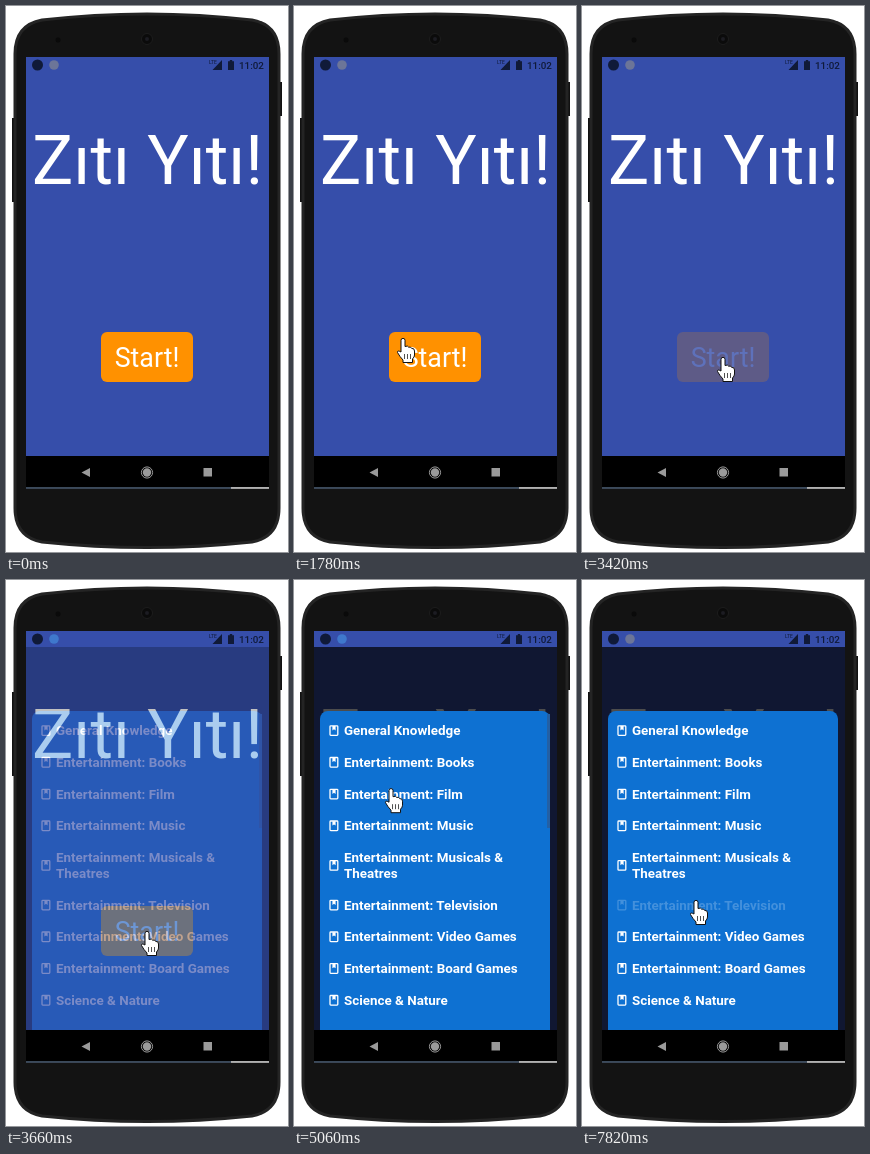
An HTML page for the animation above (8 s loop, 282 px wide and 546 px high).

```html
<!DOCTYPE html>
<html lang="en">
<head>
<meta charset="utf-8">
<style>
  html, body { margin: 0; width: 100%; height: 100%; overflow: hidden; background: #fff; }
  svg { display: block; width: 282px; height: 546px; font-family: Roboto, sans-serif; }
  .list { font-size: 13.4px; font-weight: 700; fill: #fff; }
</style>
</head>
<body>
<svg viewBox="0 0 282 546">
  <defs>
    <clipPath id="view"><rect x="20" y="51" width="243" height="399"/></clipPath>
    <g id="book">
      <rect x="36" y="-4.7" width="7.8" height="9.6" rx=".8" fill="none" stroke="#fff" stroke-width="1.3"/>
      <path d="M38.4-4.5h3.2v4.4l-1.6-1.1-1.6 1.1z"/>
    </g>
  </defs>

  <!-- phone body -->
  <path d="M6 112h3v84H6zM273 76h3v34h-3z" fill="#111"/>
  <path d="M9 48Q9 19 36 14Q141 2 246 14Q273 19 273 48V502Q273 531 246 536Q141 547 36 536Q9 531 9 502Z"
        fill="#131313" stroke="#242424" stroke-width="3"/>
  <circle cx="141" cy="33" r="5.5" fill="#0b0b0b" stroke="#1d1d1d"/>
  <circle cx="141" cy="33" r="2" fill="#1c1c22"/>
  <circle cx="52" cy="34" r="2.5" fill="#0a0a0a"/>

  <!-- app -->
  <g clip-path="url(#view)">
    <rect x="20" y="51" width="243" height="399" fill="#364eaa"/>
    <text x="26" y="178" font-size="69" fill="#fff">Zıtı Yıtı!</text>
    <g id="button">
      <rect x="95" y="326" width="92" height="50" rx="6" fill="#ff9100"/>
      <text x="141" y="361" font-size="26.8" text-anchor="middle" fill="#fff">Start!</text>
    </g>
    <g id="dialog">
      <rect x="20" y="67" width="243" height="383" fill="#000" opacity=".7"/>
      <rect x="26" y="131" width="230" height="340" rx="8" fill="#0e71d2"/>
      <rect id="scrollbar" x="253" y="134" width="3" height="114" fill="#2460a4"/>
      <g id="list" class="list"></g>
    </g>
  </g>

  <!-- status bar -->
  <g fill="#101a38">
    <circle cx="31.5" cy="59" r="5.5"/>
    <circle id="badge" cx="48" cy="59" r="4.8"/>
    <text x="203" y="58" font-size="5">LTE</text>
    <path d="M216 54V64H206.500Z"/>
    <path d="M222 55.200h1.800v-1.200h2.400v1.200H228V64h-6z"/>
    <text x="233" y="63" font-size="9.800" font-weight="500">11:02</text>
  </g>

  <!-- navigation bar -->
  <rect x="20" y="450" width="243" height="32"/>
  <g fill="#9a9a9a">
    <path d="M75.500 466.500L84 462V471Z"/>
    <circle cx="141" cy="466.500" r="4.200"/>
    <circle cx="141" cy="466.500" r="5.600" fill="none" stroke="#9a9a9a"/>
    <rect x="197.500" y="462" width="8.500" height="8.500"/>
  </g>
  <rect x="20" y="481.200" width="205" height="1.500" fill="#4a5c72"/>
  <rect x="225" y="481.200" width="38" height="1.500" fill="#ddd"/>

  <!-- pointer, with its fingertip at 0,0 -->
  <g id="pointer">
    <circle id="touch" r="12" fill="#999" opacity=".55"/>
    <path d="M-2 1.200Q-2-.6 0-.6Q2-.6 2 1.200V7.500Q5 6.300 5.600 8.200Q8 7.500 8.600 9.400Q11.500 9 11.500 12V16Q11.500 18 9.500 20V23.500H0V21Q-3 18-5.500 13.500Q-6 10.800-2 13Z"
          fill="#fff" stroke="#111" stroke-linejoin="round"/>
    <path d="M1.500 15v5M4.500 15v5M7.500 15v5" stroke="#222" stroke-width=".8"/>
  </g>
</svg>
<script>
const LOOP = 8000;
const $ = id => document.getElementById(id);

// Category rows: vertical centre, then one or two lines of text
const rows = [
  [150.5, "General Knowledge"],
  [182.2, "Entertainment: Books"],
  [214, "Entertainment: Film"],
  [245.700, "Entertainment: Music"],
  [285.300, "Entertainment: Musicals &amp;", "Theatres"],
  [325, "Entertainment: Television"],
  [356.700, "Entertainment: Video Games"],
  [388.400, "Entertainment: Board Games"],
  [420.200, "Science &amp; Nature"],
];
$("list").innerHTML = rows.map(([y, ...lines]) => {
  const text = lines.map((line, i) =>
    `<text x="50" y="${4.700 + 16 * (i - (lines.length - 1) / 2)}">${line}</text>`);
  return `<g transform="translate(0 ${y})"><use href="#book"/>${text.join("")}</g>`;
}).join("");
const chosenRow = $("list").children[5];

// Pointer path: time, x, y
const path = [
  [360, 272, 540], [620, 190, 435], [830, 60, 230], [920, 36, 185],
  [1150, 250, 122], [1230, 255, 110], [1450, 205, 235], [1660, 99, 362],
  [1780, 109, 333], [1880, 109, 333], [2150, 100, 388], [2450, 168, 378],
  [2720, 150, 354], [2870, 141, 352], [4130, 141, 352], [4200, 133, 350],
  [4500, 112, 275], [4810, 90, 194], [4990, 90, 194], [5060, 97, 209],
  [5450, 108, 285], [5810, 150, 363], [5970, 150, 363], [6570, 117, 324],
  [6740, 116, 322], [6900, 116, 322], [6980, 114, 321], [LOOP, 114, 321],
];

const ramp = (t, from, to) => Math.min(1, Math.max(0, (t - from) / (to - from)));
const between = (t, from, to) => t >= from && t < to;
const show = (id, on) => $(id).setAttribute("visibility", on ? "visible" : "hidden");
const fade = (el, value) => el.setAttribute("opacity", value);

function pointerAt(t) {
  const i = Math.max(1, path.findIndex(key => key[0] > t));
  const [t0, x0, y0] = path[i - 1], [t1, x1, y1] = path[i];
  const k = ramp(t, t0, t1);
  return [x0 + (x1 - x0) * k, y0 + (y1 - y0) * k];
}

function draw(t) {
  const pressed = ramp(t, 3270, 3420) - ramp(t, 3560, 3810);
  fade($("button"), 1 - 0.8 * pressed);
  fade($("dialog"), ramp(t, 3530, 3910));
  fade($("scrollbar"), 1 - ramp(t, 5120, 5400));
  fade(chosenRow, t < 7820 ? 1 : 0.22);
  $("badge").setAttribute("fill", between(t, 3590, 7210) ? "#3f78cc" : "#6c7598");

  const shown = t >= 360, touching = between(t, 3040, 3190) || between(t, 7670, 7820);
  show("pointer", shown);
  show("touch", touching);
  $("pointer").setAttribute("transform", `translate(${pointerAt(t)})`);
}

function tick() {
  draw(performance.now() % LOOP);
  requestAnimationFrame(tick);
}
tick();
</script>
</body>
</html>
```
